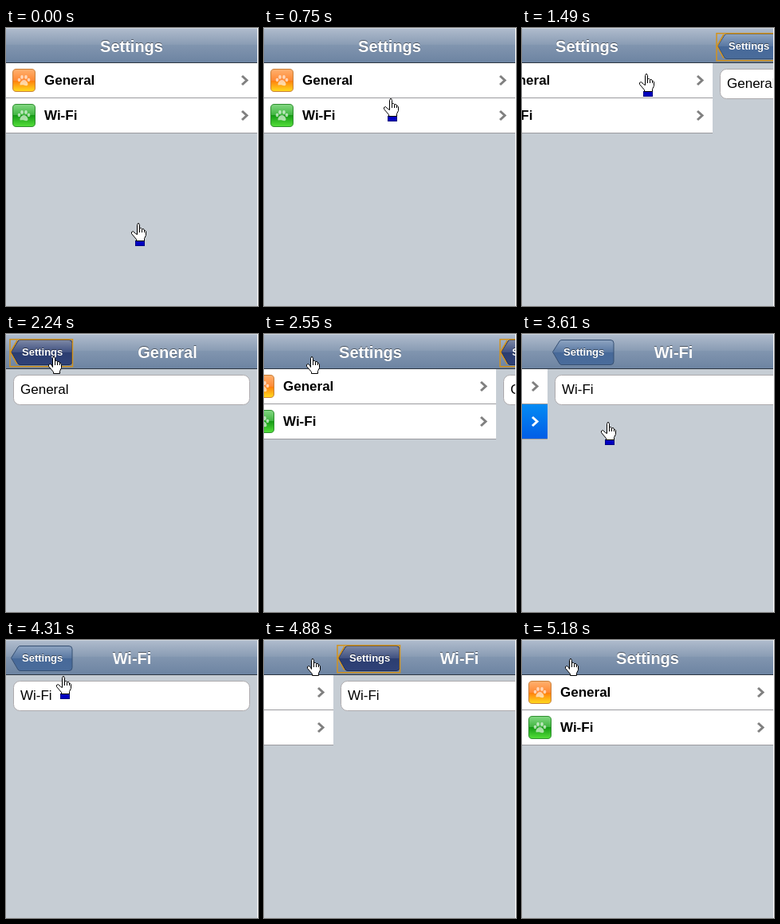
An HTML page for the animation above (6.18 s loop, 316 by 348 pixels).

```html
<!DOCTYPE html>
<html lang="en">
<head>
<meta charset="utf-8">
<title>Settings</title>
<style>
  html, body { margin: 0; width: 100%; height: 100%; overflow: hidden; background: #c6cdd4; }
  svg { display: block; font-family: "Liberation Sans", Arial, sans-serif; }
  text { white-space: pre; }
  .title { font-weight: bold; font-size: 20px; fill: #fff; text-anchor: middle; text-shadow: 0 -1px 0 rgba(0, 0, 0, .45); }
  .label { font-weight: bold; font-size: 17px; }
  .plain { font-size: 17px; }
  .back text { font-weight: bold; font-size: 13px; fill: #fff; text-shadow: 0 -1px 0 rgba(0, 0, 0, .5); }
  .back path { fill: url(#btn); stroke: #375073; }
  .back.pressed path { fill: url(#btnDown); stroke: #1f2c55; }
  .back .ring { display: none; fill: none; stroke: #d3931c; stroke-width: 1.5; }
  .back.focused .ring { display: inline; }
  .row rect { fill: #fff; }
  .row .chevron { fill: none; stroke: #808080; stroke-width: 3; }
  .row.selected rect { fill: url(#selected); }
  .row.selected .label { fill: #fff; }
  .row.selected .chevron { stroke: #fff; }
  .hand { fill: #fff; stroke: #000; }
</style>
</head>
<body>
<svg width="316" height="348" viewBox="0 0 316 348">
  <defs>
    <linearGradient id="bar" x2="0" y2="1">
      <stop offset="0" stop-color="#b0bccd"/><stop offset=".5" stop-color="#889bb3"/>
      <stop offset=".5" stop-color="#8195af"/><stop offset="1" stop-color="#6d84a2"/>
    </linearGradient>
    <linearGradient id="btn" x2="0" y2="1">
      <stop offset="0" stop-color="#8ea4c1"/><stop offset=".5" stop-color="#5877a2"/>
      <stop offset=".5" stop-color="#476999"/><stop offset="1" stop-color="#4a6c9b"/>
    </linearGradient>
    <linearGradient id="btnDown" x2="0" y2="1">
      <stop offset="0" stop-color="#7d88a5"/><stop offset=".5" stop-color="#3f5081"/>
      <stop offset=".5" stop-color="#2b3d70"/><stop offset="1" stop-color="#304278"/>
    </linearGradient>
    <linearGradient id="selected" x2="0" y2="1">
      <stop offset="0" stop-color="#048bf4"/><stop offset="1" stop-color="#015de6"/>
    </linearGradient>
    <linearGradient id="orange" x2="0" y2="1">
      <stop offset="0" stop-color="#ffb170"/><stop offset=".5" stop-color="#ff8a35"/>
      <stop offset=".5" stop-color="#ff7a0c"/><stop offset="1" stop-color="#ffdc1e"/>
    </linearGradient>
    <linearGradient id="green" x2="0" y2="1">
      <stop offset="0" stop-color="#84d884"/><stop offset=".5" stop-color="#3db43d"/>
      <stop offset=".5" stop-color="#159a15"/><stop offset="1" stop-color="#55e03c"/>
    </linearGradient>
    <g id="paw" fill="#fff" fill-opacity=".62">
      <path d="M14.5 14C17 14 19.5 17 19.5 19.3S17 21.5 14.5 20.5 9.500 21.600 9.500 19.300 12 14 14.500 14Z"/>
      <ellipse cx="8.500" cy="14" rx="1.800" ry="2.300"/><ellipse cx="12" cy="10.500" rx="1.800" ry="2.400"/>
      <ellipse cx="17" cy="10.500" rx="1.800" ry="2.400"/><ellipse cx="20.500" cy="14" rx="1.800" ry="2.300"/>
    </g>
  </defs>

  <rect width="316" height="348" fill="#c6cdd4"/>
  <rect width="315" height="43" fill="url(#bar)"/>
  <rect width="315" height="1" fill="#cdd5df"/>
  <rect y="43" width="315" height="1" fill="#2d3642"/>

  <g id="settings"><text class="title" x="157.500" y="30">Settings</text></g>
  <g id="general"></g>
  <g id="wifi"></g>

  <rect x="315" width="1" height="348" fill="#fff"/>

  <g id="cursor">
    <g id="cuffed">
      <rect x="5" y="22" width="12" height="7" fill="#000080"/>
      <rect x="6" y="23" width="10" height="5" fill="#0000c0"/>
      <path class="hand" d="M7.500 14.500V2.500L8.500 .5H9.500L10.500 2.500V7.500L11.500 6.500H12.500L13.500 7.500 14.500 7.500H15.500L16.500 9.500H17.500L18.500 10.500V15.500L16.500 19.500V22.500H6.500V20.500L.5 13.500V11.500L2.500 10.500 5.500 13.500 7.500 14.500M10.500 7V12M13.500 8V12M16.500 9V12"/>
    </g>
    <g id="link">
      <path class="hand" d="M5.500 13.500V2.500L6.500 .5H7.500L8.500 2.500V6.500L9.500 5.500H10.500L11.500 6.500H13.500L14.500 8.500H15.500L16.500 9.500V14.500L14.500 18.500V21.500H6.500V19.500L.5 12.500V10.500L2.500 9.500 4.500 11.500 5.500 13.500M8.500 6V11M11.500 7V11M14.500 8V11"/>
    </g>
  </g>
</svg>
<script>
const LOOP = 6180, WIDTH = 315, STEP = 60;
const $ = id => document.getElementById(id);

function addRow(name, y, tint) {
  $('settings').insertAdjacentHTML('beforeend', `
    <g class="row" transform="translate(0 ${y})">
      <rect width="${WIDTH}" height="43"/>
      <path d="M0 43.5H${WIDTH}" stroke="#9b9b9f"/>
      <g transform="translate(8 7)">
        <path d="M5 .5H24Q28.500 .5 28.500 5V24Q28.500 28.500 24 28.500H5Q.5 28.500 .5 24V5Q.5 .5 5 .5Z"
          fill="url(#${tint})" stroke="${tint === 'green' ? '#2f8f2f' : '#c9803a'}"/>
        <use href="#paw"/>
      </g>
      <text class="label" x="48" y="27">${name}</text>
      <path class="chevron" d="M296 16L302 21.500 296 27"/>
    </g>`);
}

function addPage(id, name, center) {
  $(id).innerHTML = `
    <text class="title" x="${center}" y="30">${name}</text>
    <g class="back">
      <path d="M6.500 22.500L15 9Q16 7.500 18 7.500H79Q83 7.500 83 11.500V34.500Q83 38.500 79 38.500H18Q16 38.500 15 37Z"/>
      <text x="20" y="27">Settings</text>
      <g class="ring"><rect x="5" y="6.750" width="78.500" height="34"/><polyline points="14,8 5.500,22.500 14,38"/></g>
    </g>
    <rect x="9.500" y="51.500" width="296" height="37" rx="8" fill="#fff" stroke="#adaaad"/>
    <text class="plain" x="18" y="75">${name}</text>`;
}

addRow('General', 44, 'orange');
addRow('Wi-Fi', 88, 'green');
addPage('general', 'General', 202.5);
addPage('wifi', 'Wi-Fi', 158);

const wifiRow = document.querySelectorAll('.row')[1];
const [generalBack, wifiBack] = document.querySelectorAll('.back');
generalBack.classList.add('focused');

// Screen refreshes: [first time, number of steps]
const runs = [[0, 1], [330, 15], [1430, 6], [1860, 4], [2240, 1], [2370, 12], [3290, 1],
  [3490, 3], [3740, 1], [4070, 5], [4440, 3], [4690, 1], [4820, 7]];

// Pointer keys: [time, x, y]
const track = [[270, 157, 244], [330, 157, 236], [630, 152, 128], [870, 148, 47], [930, 147, 53],
  [1170, 147, 57], [1730, 147, 57], [2040, 53, 28], [2670, 53, 28], [2850, 95, 100],
  [2910, 97, 106], [3030, 99, 110], [4010, 99, 110], [4310, 63, 45], [4560, 54, 23]];

function refresh(t) {
  const [start, count] = runs.findLast(r => r[0] <= t);
  return start + STEP * Math.min(Math.floor((t - start) / STEP), count - 1);
}

// cubic-bezier(.25, .1, .25, 1), solved by bisection
function ease(x) {
  if (x <= 0) return 0;
  if (x >= 1) return 1;
  let lo = 0, hi = 1, s = .5;
  for (let i = 0; i < 24; i++) {
    s = (lo + hi) / 2;
    if (.75 * s * (1 - s) + s ** 3 < x) lo = s; else hi = s;
  }
  return .3 * s * (1 - s) ** 2 + 3 * s * s * (1 - s) + s ** 3;
}

const slide = (t, start, length = 300) => ease((t - start) / length);
const place = (id, x, y = 0) =>
  $(id).setAttribute('transform', `translate(${Math.round(x)} ${Math.round(y)})`);

function pointer(t) {
  const i = track.findIndex(k => k[0] > t);
  if (i === 0) return track[0].slice(1);
  if (i < 0) return track.at(-1).slice(1);
  const [t0, x0, y0] = track[i - 1], [t1, x1, y1] = track[i];
  const p = (t - t0) / (t1 - t0);
  return [x0 + (x1 - x0) * p, y0 + (y1 - y0) * p];
}

function draw(now) {
  const t = refresh(now % LOOP);
  const general = slide(t, 1437) - slide(t, 2350);
  const wifi = slide(t, 3424) - slide(t, 4815, 340);
  place('settings', -WIDTH * (general + wifi));
  place('general', WIDTH * (1 - general));
  place('wifi', WIDTH * (1 - wifi));

  wifiRow.classList.toggle('selected', t >= 3290 && t < 4690);
  generalBack.classList.toggle('pressed', t >= 2240 && t < 3200);
  wifiBack.classList.toggle('pressed', t >= 4690);
  wifiBack.classList.toggle('focused', t >= 4690);

  const [x, y] = pointer(t);
  place('cursor', x, y);
  const overBar = y < 43;
  const onButton = overBar && x < 90;
  $('link').style.display = onButton ? '' : 'none';
  $('cuffed').style.display = onButton ? 'none' : '';
  requestAnimationFrame(() => draw(performance.now()));
}
draw(performance.now());
</script>
</body>
</html>
```
